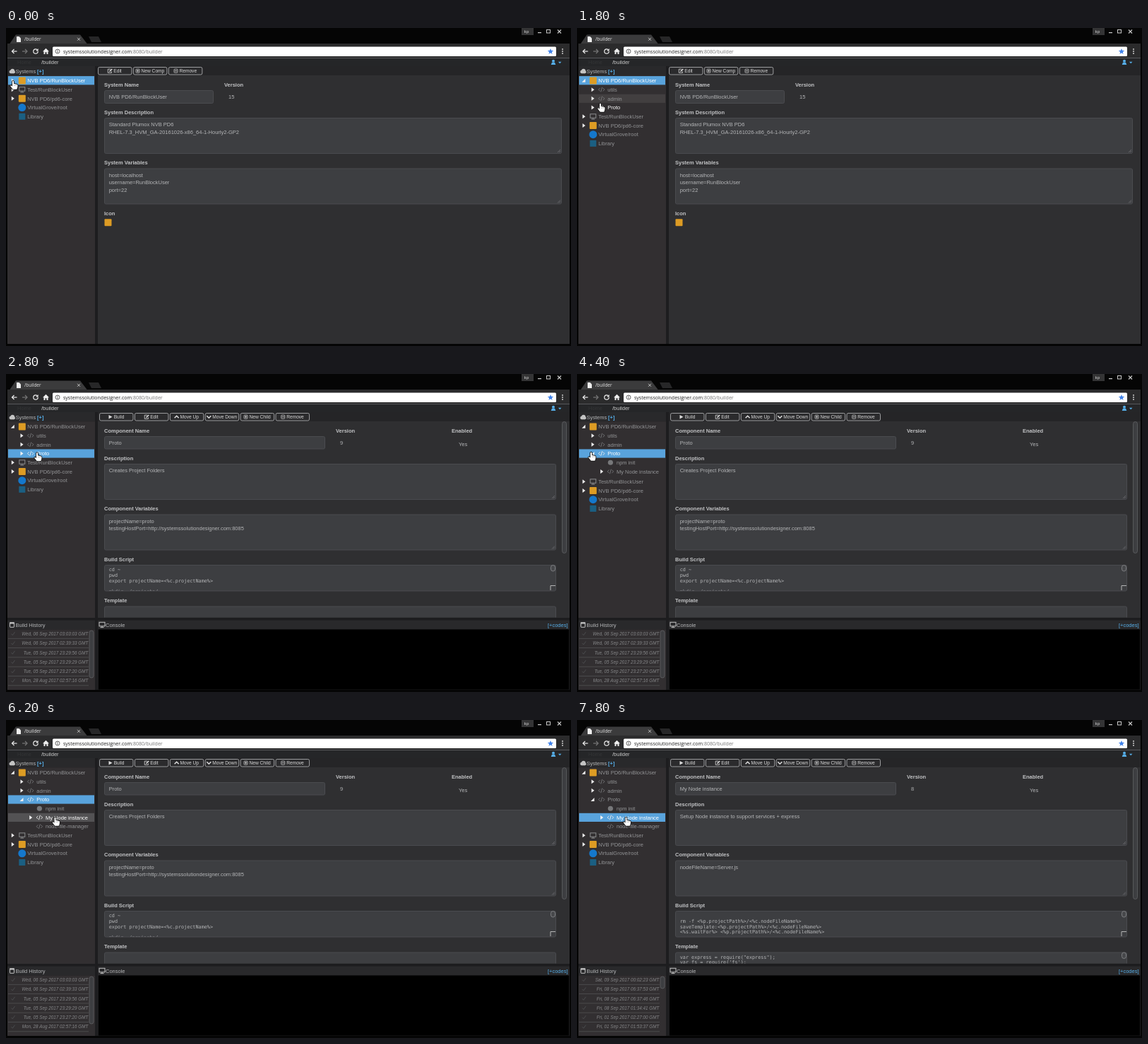
Animation of 800x450 px, one loop 8000 ms. Source, as an HTML page with a canvas:

```html
<!DOCTYPE html>
<html lang="en">
<head>
<meta charset="utf-8">
<title>/builder</title>
<style>
html, body { margin: 0; width: 100%; height: 100%; overflow: hidden; background: #000; }
canvas { display: block; width: 800px; height: 450px; }
</style>
</head>
<body>
<canvas id="stage" width="800" height="450"></canvas>
<script>
const g = document.getElementById('stage').getContext('2d');
const LOOP = 8000, STEP = 200, ROW = 12.7;
const SANS = '"Liberation Sans", Arial, sans-serif';
const UI = '"Open Sans", "Noto Sans", sans-serif';
const MONO = '"DejaVu Sans Mono", monospace';
const SIDE = '#322f31', PANEL = '#2f2f31', FIELD = '#3d3e41', EDGE = '#4a4b4f';
const INK = '#b4b5b7', BLUE = '#59a3dc', LINK = '#56aee8';

// ---- drawing helpers ----
function rect(x, y, w, h, fill) {
  g.fillStyle = fill;
  g.fillRect(x, y, w, h);
}
function round(x, y, w, h, r, fill, stroke, lw = 1) {
  g.beginPath();
  g.roundRect(x, y, w, h, r);
  if (fill) { g.fillStyle = fill; g.fill(); }
  if (stroke) { g.strokeStyle = stroke; g.lineWidth = lw; g.stroke(); }
}
function trace(pts, close) {
  g.beginPath();
  for (let i = 0; i < pts.length; i += 2) g.lineTo(pts[i], pts[i + 1]);
  if (close) g.closePath();
}
function poly(fill, ...pts) {
  trace(pts, true);
  g.fillStyle = fill;
  g.fill();
}
function line(color, lw, ...pts) {
  trace(pts);
  g.strokeStyle = color;
  g.lineWidth = lw;
  g.stroke();
}
function disc(x, y, r, fill) {
  g.beginPath();
  g.arc(x, y, r, 0, 7);
  g.fillStyle = fill;
  g.fill();
}
function text(s, x, yc, { size = 7.5, color = INK, style = '', font = SANS, align = 'left' } = {}) {
  g.font = `${style} ${size}px ${font}`;
  g.textAlign = align;
  g.fillStyle = color;
  g.fillText(s, x, yc + size * 0.36);
}
function clipped(x, y, w, h, draw) {
  g.save();
  g.beginPath();
  g.rect(x, y, w, h);
  g.clip();
  draw();
  g.restore();
}

// ---- icons, centred on x, y ----
const icons = {
  box: (x, y) => round(x - 5, y - 5, 10, 10, 1, '#dd9c24'),
  ring: (x, y) => disc(x, y, 5.5, '#1578cc'),
  lib: (x, y) => rect(x - 4.5, y - 4.5, 9, 9, '#1b5f82'),
  dot: (x, y) => disc(x, y, 3.6, '#77787a'),
  screen(x, y, c = '#8b8c8e') {
    g.strokeStyle = c;
    g.lineWidth = 1;
    g.strokeRect(x - 4, y - 3.5, 8, 5.5);
    line(c, 1, x, y + 2, x, y + 3.5);
    line(c, 1, x - 2.5, y + 3.8, x + 2.5, y + 3.8);
  },
  code(x, y, c = '#77787a') {
    line(c, 0.9, x - 2, y - 2.3, x - 4.2, y, x - 2, y + 2.3);
    line(c, 0.9, x + 2, y - 2.3, x + 4.2, y, x + 2, y + 2.3);
    line(c, 0.9, x + 0.9, y - 3.3, x - 0.9, y + 3.3);
  },
  play: (x, y) => poly('#ddd', x - 2.2, y - 2.8, x + 2.8, y, x - 2.2, y + 2.8),
  edit(x, y) {
    line('#ccc', 0.9, x + 1, y - 2.5, x - 3, y - 2.5, x - 3, y + 2.7, x + 2.2, y + 2.7, x + 2.2, y + 0.6);
    line('#ddd', 1.5, x - 0.8, y + 0.9, x + 3, y - 2.7);
  },
  up: (x, y) => line('#ddd', 1.5, x - 3, y + 1.5, x, y - 1.5, x + 3, y + 1.5),
  down: (x, y) => line('#ddd', 1.5, x - 3, y - 1.5, x, y + 1.5, x + 3, y - 1.5),
  minus(x, y) {
    round(x - 2.5, y - 2.5, 5, 5, 0.8, null, '#ccc', 0.8);
    line('#ddd', 0.9, x - 1.5, y, x + 1.5, y);
  },
  plus(x, y) {
    icons.minus(x, y);
    line('#ddd', 0.9, x, y - 1.5, x, y + 1.5);
  }
};

// ---- browser frame ----
function chrome() {
  rect(0, 0, 800, 450, '#050505');
  poly('#3b3b3c', 5, 22.5, 14, 9.5, 105, 9.5, 115, 22.5);
  rect(2, 22, 796, 20, '#2b2b2c');
  poly('#eee', 15, 12, 18.5, 12, 21, 14.5, 21, 20, 15, 20);
  text('/builder', 26, 16, { size: 6.4, color: '#e6e6e6', font: UI });
  line('#bbb', 1, 101, 13.8, 105, 17.8);
  line('#bbb', 1, 105, 13.8, 101, 17.8);
  poly('#272728', 117, 12, 131, 12, 135, 20, 121, 20);
  rect(730, 0, 17, 10, '#343435');
  text('kp', 737, 5, { size: 6, color: '#ddd', font: UI, align: 'center' });
  rect(753, 6, 5, 1.2, '#ccc');
  g.strokeStyle = '#ccc';
  g.lineWidth = 1;
  g.strokeRect(765.5, 2.5, 5, 4.5);
  line('#ccc', 1.1, 781, 2.5, 786, 7.5);
  line('#ccc', 1.1, 786, 2.5, 781, 7.5);

  line('#eee', 1.2, 15.5, 33, 8.5, 33);
  line('#eee', 1.2, 11.5, 30, 8.5, 33, 11.5, 36);
  line('#777', 1.2, 23, 33, 30, 33);
  line('#777', 1.2, 27, 30, 30, 33, 27, 36);
  g.beginPath();
  g.arc(42, 33, 3.2, 0, 5.4);
  g.strokeStyle = '#eee';
  g.lineWidth = 1.2;
  g.stroke();
  poly('#eee', 45.6, 29, 45.6, 32.6, 42.2, 32.6);
  poly('#eee', 52, 33.3, 56.5, 28.8, 61, 33.3, 59.5, 33.3, 59.5, 37, 57.5, 37, 57.5, 34.3, 55.5, 34.3, 55.5, 37, 53.5, 37, 53.5, 33.3);
  round(66, 26.5, 713, 13.5, 1.5, '#fff');
  g.beginPath();
  g.arc(73, 33, 3, 0, 7);
  g.strokeStyle = '#555';
  g.lineWidth = 0.9;
  g.stroke();
  rect(72.5, 32.5, 1, 2.4, '#555');
  rect(72.5, 31, 1, 1, '#555');
  const host = 'systemssolutiondesigner.com';
  text(host, 81, 33.2, { size: 7, color: '#222', font: UI });
  text(':8080/builder', 81 + g.measureText(host).width, 33.2, { size: 7, color: '#777', font: UI });
  const star = [];
  for (let i = 0; i < 10; i++) {
    const a = i * Math.PI / 5 - Math.PI / 2, r = i % 2 ? 1.9 : 4.4;
    star.push(771 + r * Math.cos(a), 33.3 + r * Math.sin(a));
  }
  poly('#3f82ea', ...star);
  for (let i = -1; i < 2; i++) disc(788, 33 + i * 3, 0.9, '#ddd');

  rect(2, 42, 796, 405, '#1d1d1f');
  rect(2, 42, 796, 1, '#56575a');
  rect(2, 43, 796, 11, '#252628');
  text('Home', 16, 48.5, { color: '#343537' });
  text('/builder', 50, 48.7, { color: '#c8c8c8' });
  disc(775, 46.8, 2, LINK);
  poly(LINK, 771.7, 52, 773, 48.8, 777, 48.8, 778.3, 52);
  poly(LINK, 782, 47.7, 786.4, 47.7, 784.2, 50.2);
}

// ---- sidebar tree ----
const leaf = (name, icon, arrow) => ({ name, icon, arrow });
const proto = {
  name: 'Proto', icon: 'code', arrow: true, open: 4400,
  kids: [leaf('npm init', 'dot'), leaf('My Node instance', 'code', true), leaf('node-file-manager', 'code')]
};
const tree = [
  {
    name: 'NVB PD6/RunBlockUser', icon: 'box', arrow: true, open: 800,
    kids: [leaf('utils', 'code', true), leaf('admin', 'code', true), proto]
  },
  leaf('Test/RunBlockUser', 'screen', true),
  leaf('NVB PD6/pd6-core', 'box', true),
  leaf('VirtualGrove/root', 'ring'),
  leaf('Library', 'lib')
];

// Opening slides: part of the height first, then all of it.
const openness = (n, t) => !n.kids || t < n.open ? 0 : t < n.open + STEP ? 0.71 : 1;

function place(list, depth, y, t, limit, out) {
  for (const n of list) {
    out.push({ n, depth, y, limit });
    y += ROW;
    const k = openness(n, t);
    if (k) {
      const inner = [];
      const full = place(n.kids, depth + 1, y, t, limit, inner) - y;
      const end = y + full * k;
      for (const r of inner) r.limit = Math.min(r.limit, end);
      out.push(...inner);
      y = end;
    }
  }
  return y;
}
function layout(t) {
  const out = [];
  place(tree, 0, 68.1, t, 450, out);
  return out;
}

const path = [
  [0, 10, 75], [200, 19, 77], [400, 27, 77], [1000, 27, 80], [1200, 28, 87], [1400, 30, 95],
  [1600, 32, 101], [1800, 33, 107], [2000, 40, 111], [2200, 44, 111.5], [3200, 40, 112],
  [3400, 33, 112], [3600, 27, 112], [3800, 22, 111], [4000, 20, 111], [4800, 28, 116],
  [5000, 42, 124], [5200, 54, 132], [5400, 62, 140], [5600, 67, 147], [5800, 70, 146],
  [6000, 71, 142], [6200, 69.5, 138]
];
const pointer = t => path.findLast(p => p[0] <= t) || path[0];

function hovered(t) {
  const y = pointer(t)[2] + 1;
  const row = layout(t).find(r => y >= r.y && y < Math.min(r.y + ROW, r.limit));
  return row && row.n.name;
}

function sidebar(t) {
  rect(2, 54, 124, 393, SIDE);
  rect(2, 54, 124, 13.5, '#29292b');
  disc(6.8, 62, 2.3, '#c4c4c4');
  disc(9.2, 60.6, 2.9, '#c4c4c4');
  disc(11, 62.2, 2, '#c4c4c4');
  rect(6.8, 61.5, 4.4, 2.8, '#c4c4c4');
  text('Systems', 13.5, 61.2);
  text('[+]', 44, 61.2, { color: LINK, style: 'bold' });

  const sel = t < 2400 ? tree[0].name : t < 7400 ? 'Proto' : 'My Node instance';
  const now = hovered(t), lit = hovered(Math.max(0, t - STEP));
  for (const { n, depth, y, limit } of layout(t)) {
    if (limit <= y) continue;
    clipped(2, y, 124, Math.min(ROW, limit - y), () => {
      const on = n.name === sel, hot = on || n.name === now;
      const x = 9.5 + depth * 12.7, c = y + ROW / 2;
      if (on) rect(3, y, 122, 12.4, BLUE);
      else if (n.name === lit) rect(3, y, 122, 12.4, n.name === now ? '#535254' : '#423f40');
      if (n.arrow) {
        if (openness(n, t)) poly('#eee', x + 2.3, c - 2.6, x + 2.3, c + 2.4, x - 2.7, c + 2.4);
        else poly('#f2f2f2', x - 1.7, c - 3, x + 2.3, c, x - 1.7, c + 3);
      }
      const tone = hot && n.icon === 'code' ? '#eee' : undefined;
      icons[n.icon](x + 13.3 - (depth ? 0.8 : 0), c, tone);
      text(n.name, x + 20.7 + (depth ? 0.4 : 0), c, { color: hot ? '#fff' : '#929395' });
    });
  }
}

// ---- main panel ----
function toolbar(x, items) {
  rect(130, 54, 668, 13, '#252527');
  items.forEach(([icon, label], i) => {
    const bx = x + i * 49.9;
    round(bx + 0.5, 55.5, 47.5, 10.5, 2, '#2b2b2d', '#a9aaac', 0.9);
    g.font = `6.6px ${SANS}`;
    const left = bx + 24 - (g.measureText(label).width + 8) / 2;
    icons[icon](left + 3, 60.7);
    text(label, left + 8, 60.7, { size: 6.6, color: '#d8d8d8' });
  });
}
const label = (s, x, y) => text(s, x, y, { style: 'bold', color: '#c2c3c5' });

function field(x, y, w, h, lines = [], { mono, dim, grip } = {}) {
  round(x + 0.5, y + 0.5, w - 1, h - 1, 2, FIELD, EDGE);
  clipped(x, y, w, h - 1, () => lines.forEach((s, i) => {
    const opts = mono ? { size: 6.8, font: MONO } : { color: dim ? '#505155' : INK };
    text(s, x + 6.7, y + (mono ? 6.8 + i * 7.7 : 9.4 + i * 10.7), opts);
  }));
  if (grip) {
    const r = x + w - 2, b = y + h - 2;
    line('#77787b', 0.7, r - 4, b, r, b - 4);
    line('#77787b', 0.7, r - 2, b, r, b - 2);
  }
}
function thumb(y, corner) {
  round(771.5, y + 0.5, 6, 8.5, 3, '#47484b', '#8b8c8f', 0.8);
  if (corner) line('#b5b5b5', 1, 771, y + 36, 771, y + 29.5, 778, y + 29.5);
}
function scrollbar(x, y, h) {
  round(x + 0.5, y + 0.5, 6, h, 3, '#3d3e41', '#606164', 0.8);
}

function systemForm() {
  toolbar(130, [['edit', 'Edit'], ['plus', 'New Comp'], ['minus', 'Remove']]);
  label('System Name', 139, 80.3);
  label('Version', 309, 80.3);
  field(139, 88, 155, 19, ['NVB PD6/RunBlockUser']);
  text('15', 315, 97.2);
  label('System Description', 139, 119.7);
  field(139, 127, 648, 51, ['Standard Plumox NVB PD6', 'RHEL-7.3_HVM_GA-20161026-x86_64-1-Hourly2-GP2'], { grip: true });
  label('System Variables', 139, 190.7);
  field(139, 198.5, 648, 51, ['host=localhost', 'username=RunBlockUser', 'port=22'], { grip: true });
  label('Icon', 139, 262);
  icons.box(144.5, 275.3);
}

const blank = {
  name: 'Enter name...', about: ['Enter component description'], vars: ['Enter variables'],
  script: [], template: [], dim: true
};
const protoData = {
  name: 'Proto', version: '9', about: ['Creates Project Folders'],
  vars: ['projectName=proto', 'testingHostPort=http://systemssolutiondesigner.com:8085'],
  script: ['cd ~', 'pwd', 'export projectName=<%c.projectName%>', '', 'mkdir ./projects/'],
  template: []
};
const nodeData = {
  name: 'My Node instance', version: '8', about: ['Setup Node instance to support services + express'],
  vars: ['nodeFileName=Server.js'],
  script: ['', 'rm -f <%p.projectPath%>/<%c.nodeFileName%>',
    'saveTemplate:<%p.projectPath%>/<%c.nodeFileName%>',
    '<%s.waitFor%> <%p.projectPath%>/<%c.nodeFileName%>'],
  template: ['var express = require("express");', "var fs = require('fs');"]
};

function componentForm(d) {
  toolbar(132, [['play', 'Build'], ['edit', 'Edit'], ['up', 'Move Up'], ['down', 'Move Down'],
    ['plus', 'New Child'], ['minus', 'Remove']]);
  const dim = d.dim, grip = true;
  label('Component Name', 139, 80.3);
  label('Version', 467, 80.3);
  label('Enabled', 631, 80.3);
  field(139, 88, 313, 18.5, [d.name], { dim });
  if (!dim) {
    text(d.version, 473, 97);
    text('Yes', 641, 98.8);
  }
  clipped(130, 67, 668, dim ? 380 : 277.5, () => {
    g.translate(0, dim ? 0.5 : 0);
    label('Description', 139, 119.7);
    field(139, 127, 640, 51, d.about, { dim, grip });
    label('Component Variables', 139, 190.7);
    field(139, 198.5, 640, 51, d.vars, { dim, grip });
    label('Build Script', 139, 262);
    field(139, 270, 640, 37.5, d.script, { mono: true, grip: dim });
    label('Template', 139, 320.7);
    field(139, 328.5, 640, 37.5, d.template, { mono: true, grip });
    label('File Resources', 139, 379.2);
    label('Test Script', 139, 400.3);
    field(139, 408, 640, 37.5, [], { grip });
    if (d.script.length) thumb(270, true);
    if (d.template.length) thumb(328.5);
  });
  scrollbar(787, 67, dim ? 370 : 186);
}

const protoRuns = ['Wed, 06 Sep 2017 03:03:03', 'Wed, 06 Sep 2017 02:39:33', 'Tue, 05 Sep 2017 23:29:56',
  'Tue, 05 Sep 2017 23:29:29', 'Tue, 05 Sep 2017 23:27:20', 'Mon, 28 Aug 2017 02:57:16'];
const nodeRuns = ['Sat, 09 Sep 2017 00:02:23', 'Fri, 08 Sep 2017 06:37:53', 'Fri, 08 Sep 2017 06:37:46',
  'Fri, 08 Sep 2017 01:34:41', 'Fri, 01 Sep 2017 02:27:00', 'Fri, 01 Sep 2017 01:53:37'];

function bottom(runs, thumbH) {
  rect(2, 345, 796, 102, '#1d1d1f');
  rect(2, 348.5, 124, 13, '#29292b');
  rect(130, 348.5, 668, 13, '#29292b');
  round(5.5, 351.8, 6, 6.5, 0.5, null, '#c4c4c4');
  rect(5, 351.5, 7, 2, '#c4c4c4');
  text('Build History', 13.5, 355.2);
  icons.screen(136, 354.8, '#c4c4c4');
  text('Console', 141, 355.2);
  text('[+codes]', 795.5, 355.2, { color: LINK, align: 'right' });
  rect(131, 361.5, 666, 85, '#000');
  rect(2, 361.5, 124, 85.5, SIDE);
  runs.forEach((s, i) => {
    const y = 367.7 + i * 13.3;
    rect(3, y + 6.2, 114, 0.8, '#505052');
    line('#4b4c4e', 1, 7.5, y, 9.3, y + 2, 12.5, y - 2.5);
    text(s + ' GMT', 116.3, y, { size: 6.3, style: 'italic', color: '#858688', align: 'right' });
  });
  scrollbar(117.5, 362.5, thumbH);
}

function hand(x, y) {
  g.save();
  g.translate(x, y);
  trace([-1, 0.4, 0, -0.4, 1, 0.4, 1, 4, 2.2, 3.7, 3, 4.4, 4.3, 4.2, 5, 5, 6, 5, 6.5, 6,
    6.3, 9, 5.3, 11.8, -0.2, 11.8, -3.6, 7.6, -3.6, 6.4, -2.6, 6.2, -1, 7.6], true);
  g.lineJoin = 'round';
  g.strokeStyle = '#111';
  g.lineWidth = 1.6;
  g.stroke();
  g.fillStyle = '#fff';
  g.fill();
  for (const fx of [1.2, 2.9, 4.6]) line('#777', 0.4, fx, 5, fx, 7.2);
  g.restore();
}

function draw(time) {
  const t = Math.floor(time / STEP) * STEP;
  chrome();
  rect(130, 54, 668, 393, PANEL);
  if (t < 2600) systemForm();
  else if (t < 2800) componentForm(blank);
  else {
    componentForm(t < 7600 ? protoData : nodeData);
  }
  sidebar(t);
  if (t >= 2800) t < 7800 ? bottom(protoRuns, 67) : bottom(nodeRuns, 17);
  const [, x, y] = pointer(t);
  hand(x, y);
}

const start = performance.now();
function tick() {
  draw((performance.now() - start) % LOOP);
  requestAnimationFrame(tick);
}
tick();
</script>
</body>
</html>
```
